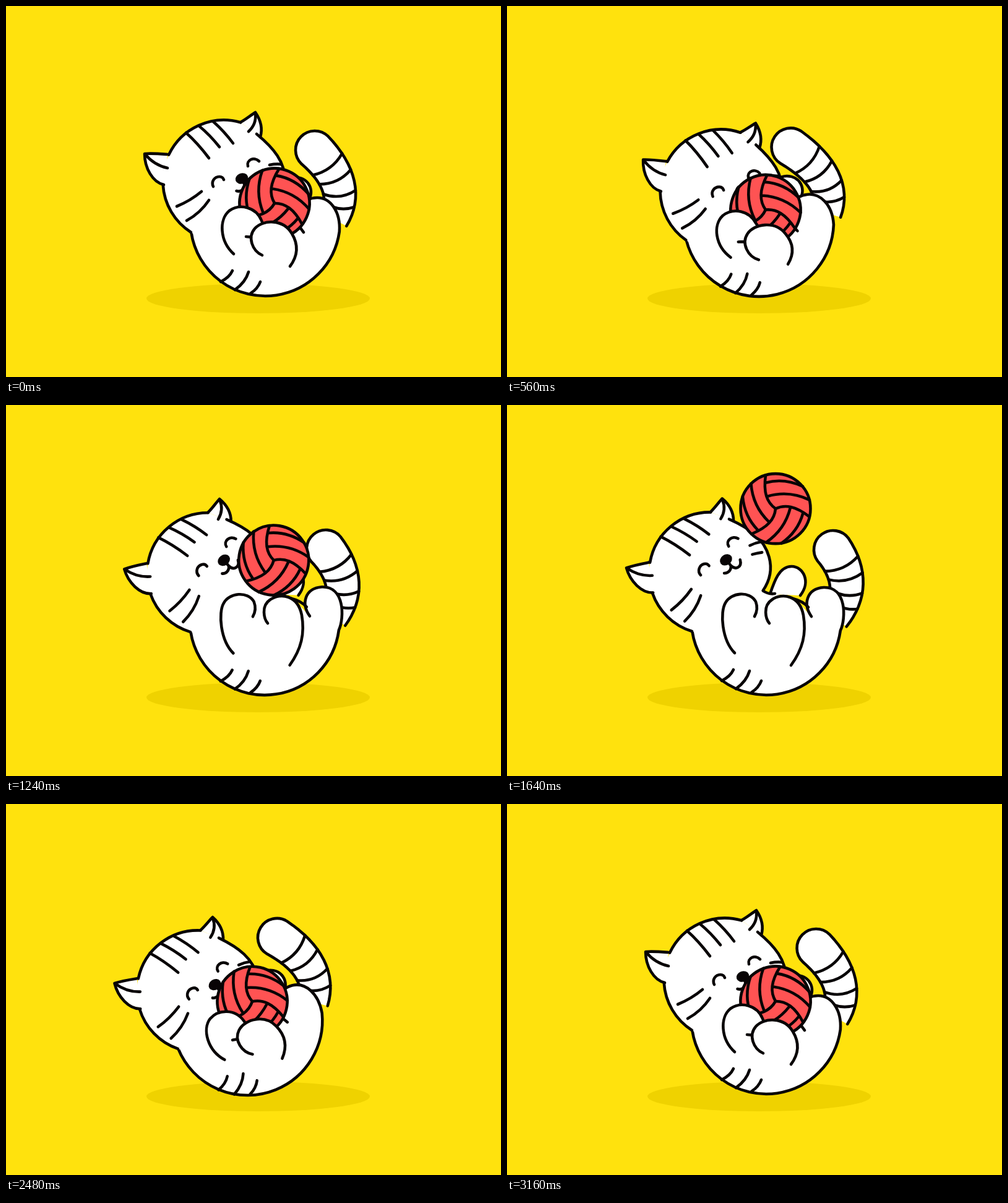
Recreate the animation shown at these times as an HTML page with a canvas. Size 800 px wide and 600 px high, loop 3200 ms.

```html
<!DOCTYPE html>
<html lang="en">
<head>
<meta charset="utf-8">
<title>Cat with a ball of yarn</title>
<style>
html, body { margin: 0; width: 100%; height: 100%; overflow: hidden; background: #ffe20d; }
canvas { display: block; width: 800px; height: 600px; }
</style>
</head>
<body>
<canvas id="stage" width="800" height="600"></canvas>
<script>
const ctx = document.getElementById('stage').getContext('2d');
const LOOP = 3200, INK = '#080405', RAD = Math.PI / 180;
const BODY = { x: 419, y: 348, r: 121 }, NECK = { x: 299, y: 366 };
const HEAD = { x: 352, y: 283, r: 98.5 }, BALL = { x: 434, y: 319, r: 56.5 };

const smooth = x => x * x * (3 - 2 * x);
const quart = x => x < .5 ? 8 * x ** 4 : 1 - 8 * (1 - x) ** 4;
const rise = x => x * (2 - x);
const fall = x => x * x;

// Keys are [time, value, easing into this key]
const tracks = {
  roll: [[0, 0], [900, -6.8, quart], [940, -6.8], [1300, 0], [1780, 0], [2500, -13.7], [2930, 0], [LOOP, 0]],
  head: [[0, 0], [900, 9.8, quart], [925, 9.8], [1220, -15.4], [1720, -15.4], [2080, 7.7], [2130, 7.6], [2460, .2], [LOOP, 0]],
  reach: [[0, 0], [900, -.15, quart], [980, -.15], [1220, 1], [1820, 1], [2070, -.1], [2460, 0], [LOOP, 0]],
  sink: [[0, 0], [900, 13, quart], [940, 13], [1140, 0], [1900, 0], [2110, -5], [2460, 1], [LOOP, 0]],
  fly: [[0, 0], [1090, 0], [1680, -152, rise], [2080, 0, fall], [LOOP, 0]],
  spin: [[0, 0], [900, -6, quart], [1090, -6], [1640, -24, rise], [1700, -24], [2100, -5], [2480, -11], [2930, 0], [LOOP, 0]],
  tailX: [[0, 80], [900, 60, quart], [960, 60], [1340, 108], [1720, 108], [2120, 81], [2500, 78], [2900, 92], [LOOP, 80]],
  tailY: [[0, -115], [1720, -114], [2120, -120.5], [2480, -119], [2920, -115], [LOOP, -115]]
};

function at(keys, t) {
  const i = keys.findIndex(k => k[0] > t);
  const [t0, v0] = keys[i - 1], [t1, v1, ease = smooth] = keys[i];
  return v0 + (v1 - v0) * ease((t - t0) / (t1 - t0));
}

// Limb outlines: holding the yarn, and stretched out
const limbs = {
  back: [
    [539, 365, 541, 332, 524, 310, 503, 310, 482, 310, 452, 330, 481, 366],
    [539, 365, 548, 345, 549, 294, 512, 295, 484, 297, 478, 322, 492, 342]],
  farArm: [
    [440, 300, 448, 285, 458, 276, 470, 277, 490, 279, 502, 300, 484, 322],
    [425, 306, 432, 285, 440, 261, 460, 261, 478, 261, 492, 285, 474, 308]],
  nearArm: [
    [368, 401, 345, 380, 344, 345, 361, 331, 378, 319, 404, 325, 413, 347, 414, 349, 415, 352, 415, 354],
    [368, 401, 347, 380, 344, 335, 353, 320, 362, 303, 392, 300, 402, 318, 405, 326, 404, 335, 400, 342]],
  nearLeg: [
    [414, 403, 398, 396, 390, 374, 402, 360, 415, 345, 448, 344, 462, 368, 474, 388, 471, 405, 459, 421],
    [424, 353, 418, 346, 413, 325, 428, 315, 445, 303, 473, 308, 479, 340, 484, 370, 478, 395, 459, 421]],
  crease: [
    [388, 373, 392, 373, 396, 374, 402, 374],
    [430, 340, 434, 340, 438, 340, 442, 340]]
};

const art = {
  belly: 'M366 428Q361 439 347 446M392 430Q387 447 370 459M411 446Q407 457 395 465',
  chest: 'M413 300C420 305 427 306 433 305M462 313Q478 317 487 327',
  leftEar: 'M261 240C248 239 236 238 224 239C224 262 237 285 255 289',
  rightEar: 'M379 188C388 183 395 177 403 172C412 185 415 198 411 212',
  earFolds: 'M225 240C235 252 247 259 261 262M403 174Q405 191 392 203',
  cheek: 'M405 207C433 230 451 252 451 283C451 305 440 322 427 333',
  crown: 'M291 205Q310 222 328 246M312 194Q330 209 345 228M335 187Q353 203 367 222',
  whiskers: 'M316 300Q298 315 276 324M328 314Q314 335 292 347' +
    'M426 257Q436 255 445 256M426 272Q434 272 442 273',
  face: 'M335 292C331 284 337 276 345 276C349 276 351 278 352 281' +
    'M391 259C388 249 401 243 409 251' +
    'M383 283L386 290M372.5 299C378 301 385 298 386 290C392 300 403 297 403 285'
};
for (const k in art) art[k] = new Path2D(art[k]);

function mixLimb(name, p) {
  const [a, b] = limbs[name];
  return a.map((v, i) => v + (b[i] - v) * p);
}

function trace(path, n) {
  for (let i = 2; i < n.length; i += 6) path.bezierCurveTo(...n.slice(i, i + 6));
}

function limb(name, p) {
  const n = mixLimb(name, p), path = new Path2D();
  path.moveTo(n[0], n[1]);
  trace(path, n);
  return path;
}

function paint(path, fill = '#fff') {
  ctx.fillStyle = fill;
  ctx.fill(path);
  ctx.stroke(path);
}

function turn(x, y, deg) {
  ctx.translate(x, y);
  ctx.rotate(deg * RAD);
  ctx.translate(-x, -y);
}

function drawTail(tx, ty) {
  const T = [BODY.x + tx, BODY.y + ty], B = [530, 345];
  const C = [BODY.x + 140 + (tx - 80) * .35, BODY.y - 57];
  const spot = u => {
    const v = 1 - u;
    const [x, y] = [0, 1].map(i => v * v * T[i] + 2 * u * v * C[i] + u * u * B[i]);
    const [dx, dy] = [0, 1].map(i => v * (C[i] - T[i]) + u * (B[i] - C[i]));
    const len = Math.hypot(dx, dy);
    return { x, y, dx: dx / len, dy: dy / len, w: 31 - 8 * u };
  };
  const edge = (s, side) => [s.x + side * s.dy * s.w, s.y - side * s.dx * s.w];
  const shape = new Path2D(), n = 16;
  for (let i = n; i >= 0; i--) shape.lineTo(...edge(spot(i / n), -1));
  const tip = spot(0), a = Math.atan2(tip.dx, -tip.dy);
  shape.arc(tip.x, tip.y, tip.w, a, a + Math.PI);
  for (let i = 0; i <= n; i++) shape.lineTo(...edge(spot(i / n), 1));
  paint(shape);
  for (const u of [.2, .38, .6, .78]) {
    const s = spot(u), stripe = new Path2D();
    stripe.moveTo(...edge(s, -1));
    stripe.quadraticCurveTo(s.x + s.dx * 13, s.y + s.dy * 13, ...edge(s, 1));
    ctx.stroke(stripe);
  }
}

function drawBody(p) {
  const n = mixLimb('back', p);
  const outline = new Path2D();
  outline.arc(BODY.x, BODY.y, BODY.r, 171.5 * RAD, 8 * RAD, true);
  trace(outline, n);
  const fill = new Path2D(outline);
  fill.lineTo(465, 313);
  fill.lineTo(415, 301);
  fill.lineTo(HEAD.x, HEAD.y);
  ctx.fillStyle = '#fff';
  ctx.fill(fill);
  ctx.stroke(outline);
  ctx.stroke(art.belly);
  ctx.stroke(art.chest);
}

function drawHead(tilt) {
  ctx.save();
  turn(NECK.x, NECK.y, tilt);
  const arc = (a, b) => {
    ctx.beginPath();
    ctx.arc(HEAD.x, HEAD.y, HEAD.r, a * RAD, b * RAD);
    ctx.stroke();
  };
  ctx.fillStyle = '#fff';
  ctx.beginPath();
  ctx.arc(HEAD.x, HEAD.y, HEAD.r, 80 * RAD, 286 * RAD);
  ctx.lineTo(405, 207);
  ctx.bezierCurveTo(433, 230, 451, 252, 451, 283);
  ctx.bezierCurveTo(451, 305, 440, 322, 427, 333);
  ctx.fill();
  paint(art.leftEar);
  paint(art.rightEar);
  arc(122.6, 176.5);
  arc(205.5, 286);
  for (const k of ['earFolds', 'cheek', 'crown', 'whiskers']) ctx.stroke(art[k]);

  // The face slides a little over the head as it nods
  ctx.translate(tilt * (tilt > 0 ? .5 : -.11), tilt * (tilt > 0 ? .2 : .64));
  ctx.stroke(art.face);
  ctx.fillStyle = INK;
  ctx.beginPath();
  ctx.ellipse(381, 279, 10.5, 8.5, -20 * RAD, 0, 7);
  ctx.fill();
  ctx.restore();
}

function drawBall(x, y, deg) {
  ctx.save();
  ctx.translate(x, y);
  ctx.rotate((deg + 24) * RAD);
  const disc = new Path2D();
  disc.arc(0, 0, BALL.r, 0, 7);
  paint(disc, '#ff5353');
  const yarn = new Path2D('M0 0C-14 -10 -20 -26 -16 -54M-16 -42Q14 -50 44 -36M-13 -20Q22 -30 55 -14');
  for (let i = 0; i < 3; i++) {
    ctx.stroke(yarn);
    ctx.rotate(120 * RAD);
  }
  ctx.restore();
}

function draw(t) {
  const s = {};
  for (const k in tracks) s[k] = at(tracks[k], t);

  ctx.fillStyle = '#ffe20d';
  ctx.fillRect(0, 0, 800, 600);
  ctx.fillStyle = '#efd200';
  ctx.beginPath();
  ctx.ellipse(407.5, 473, 180.5, 24, 0, 0, 7);
  ctx.fill();

  ctx.strokeStyle = INK;
  ctx.lineWidth = 4.6;
  ctx.lineCap = ctx.lineJoin = 'round';

  // The body rolls along the ground
  const dx = s.roll * 2.1, dy = -s.roll * .15;
  const rollIn = () => {
    ctx.save();
    ctx.translate(dx, dy);
    turn(BODY.x, BODY.y, s.roll);
  };

  rollIn();
  drawTail(s.tailX, s.tailY);
  paint(limb('farArm', s.reach));
  drawBody(s.reach);
  drawHead(s.head);
  ctx.restore();

  const c = Math.cos(s.roll * RAD), n = Math.sin(s.roll * RAD);
  const bx = BALL.x - BODY.x - Math.abs(s.sink) * .2, by = BALL.y - BODY.y + s.sink;
  drawBall(BODY.x + dx + bx * c - by * n, BODY.y + dy + bx * n + by * c + s.fly, s.spin);

  rollIn();
  paint(limb('nearArm', s.reach));
  ctx.stroke(limb('crease', s.reach));
  paint(limb('nearLeg', s.reach));
  ctx.restore();
}

const start = performance.now();
function tick() {
  draw((performance.now() - start) % LOOP);
  requestAnimationFrame(tick);
}
tick();
</script>
</body>
</html>
```
